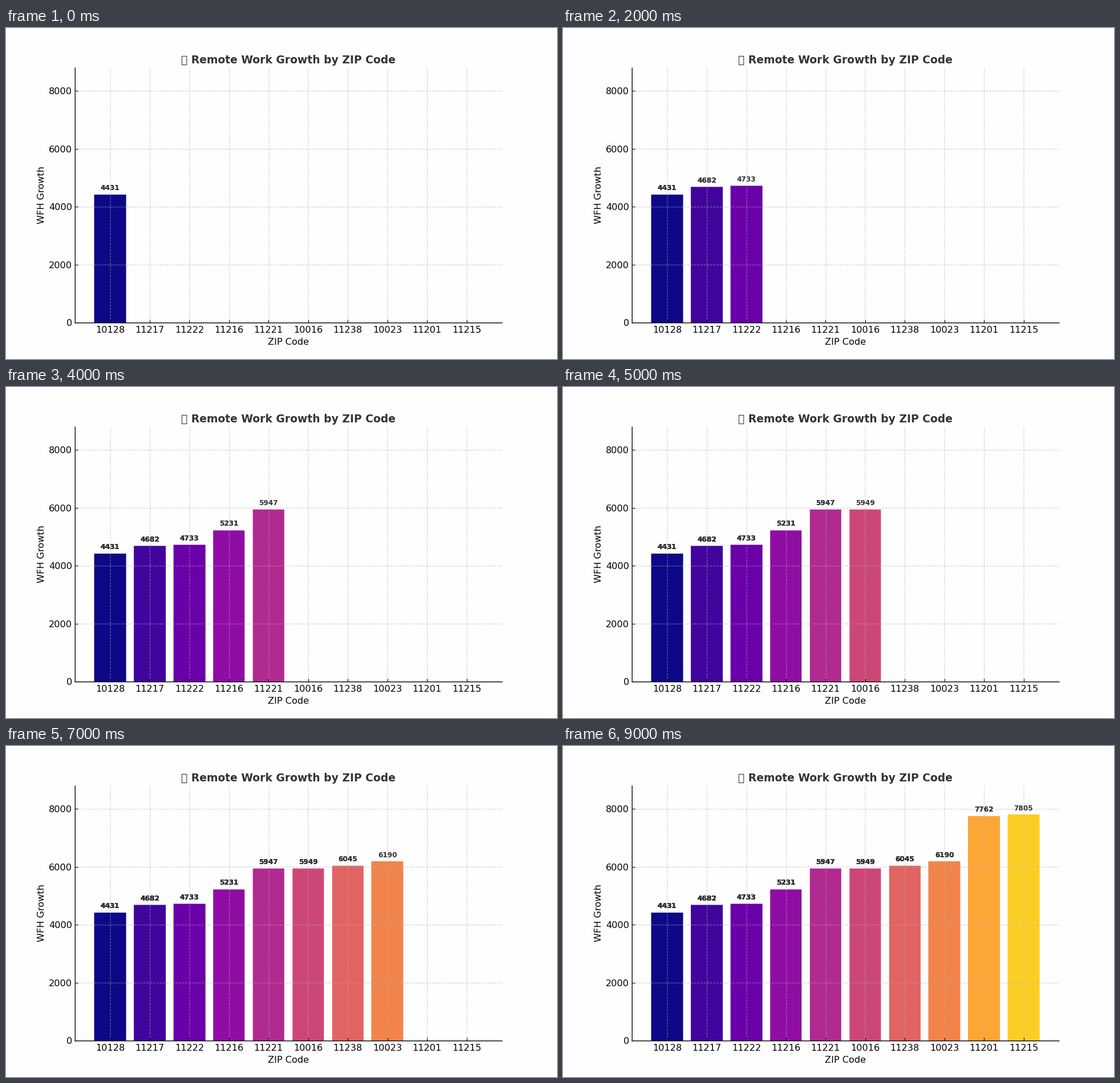
These frames come from a looping animation (966 px wide and 580 px high, 10000 ms). A matplotlib script:

```python
import math

import matplotlib.pyplot as plt
from matplotlib.animation import FuncAnimation
from matplotlib.lines import Line2D
from matplotlib.patches import Rectangle
from matplotlib.transforms import Affine2D

W, H, DPI = 966, 580, 96
K = 96.6 / DPI  # point scale: the layout is ten inches wide

# Lines and bars sit on whole pixels of a 1000 x 600 layout, y downwards,
# which the stage shows slightly reduced.
LW, LH = 1000, 600
LEFT, RIGHT, TOP, BOTTOM = 125, 900, 72, 534

ZIPS = ["10128", "11217", "11222", "11216", "11221",
        "10016", "11238", "10023", "11201", "11215"]
GROWTH = [4431, 4682, 4733, 5231, 5947, 5949, 6045, 6190, 7762, 7805]
N = len(ZIPS)
X_MIN, X_MAX = -0.89, N - 0.11
Y_MAX = max(GROWTH) + 1000
Y_TICKS = range(0, 8001, 2000)
BG = "#fefefe"

plt.rcParams.update({
    "font.family": "DejaVu Sans",
    "font.size": 12 * K,
    "xtick.direction": "in",
    "ytick.direction": "in",
    "axes.labelsize": 12 * K,
    "xtick.labelsize": 12 * K,
    "ytick.labelsize": 12 * K,
    "xtick.major.pad": 4,
})

fig, ax = plt.subplots(figsize=(W / DPI, H / DPI), dpi=DPI, facecolor=BG)
fig.subplots_adjust(left=LEFT / LW, right=RIGHT / LW,
                    bottom=1 - BOTTOM / LH, top=1 - TOP / LH)
layout = Affine2D().scale(1 / LW, -1 / LH).translate(0, 1) + fig.transFigure

ax.set_facecolor(BG)
ax.spines[:].set_visible(False)
ax.set_xlim(X_MIN, X_MAX)
ax.set_ylim(0, Y_MAX)
ax.set_xticks(range(N), ZIPS)
ax.set_yticks(Y_TICKS)
ax.set_xlabel("ZIP Code", labelpad=4.7)
ax.set_ylabel("WFH Growth")
# The leading symbol has no glyph in this font and shows as an empty box.
ax.set_title("\U0001F4C8 Remote Work Growth by ZIP Code",
             fontsize=14 * K, fontweight="bold", color="#333333")


def px(x):
    return math.floor(LEFT + (x - X_MIN) / (X_MAX - X_MIN) * (RIGHT - LEFT) + 0.5)


def py(y):
    return math.floor(BOTTOM - y / Y_MAX * (BOTTOM - TOP) + 0.5)


def add_line(xs, ys, **style):
    line = Line2D([x + 0.5 for x in xs], [y + 0.5 for y in ys],
                  transform=layout, snap=False, clip_on=False, **style)
    ax.add_line(line)


def add_bar(i):
    x0, x1, y = px(i - 0.4), px(i + 0.4), py(GROWTH[i])
    bar = Rectangle((x0, y), x1 - x0, BOTTOM - y, transform=layout,
                    snap=False, linewidth=0, color=plt.cm.plasma(i / N))
    return ax.add_patch(bar)


GRID = dict(color="#b0b0b0", alpha=0.6, linestyle="--",
            linewidth=0.8 * K, zorder=1.5)
SPINE = dict(color="black", linewidth=1.0 * K, zorder=2.5,
             solid_capstyle="projecting")

for i in range(N):
    add_line([px(i)] * 2, [BOTTOM, TOP], **GRID)
for t in Y_TICKS:
    add_line([LEFT, RIGHT], [py(t)] * 2, **GRID)
add_line([LEFT, LEFT], [BOTTOM, TOP], **SPINE)
add_line([LEFT, RIGHT], [BOTTOM, BOTTOM], **SPINE)

bars = [add_bar(i) for i in range(N)]
labels = []


def add_label(j):
    labels.append(ax.text(j, GROWTH[j] + 88, str(GROWTH[j]),
                          ha="center", va="bottom", fontsize=9 * K,
                          fontweight="bold", color="#333333"))


def update(step):
    while labels:
        labels.pop().remove()
    for j, bar in enumerate(bars):
        bar.set_visible(j <= step)
        # Labels are laid over themselves once per step, so edges darken.
        for _ in range(step - j + 1 + (j == 0)):
            add_label(j)
    return [*bars, *labels]


anim = FuncAnimation(fig, update, frames=N, interval=1000,
                     init_func=lambda: update(0), repeat=True,
                     repeat_delay=0, blit=False)
plt.show()
```
